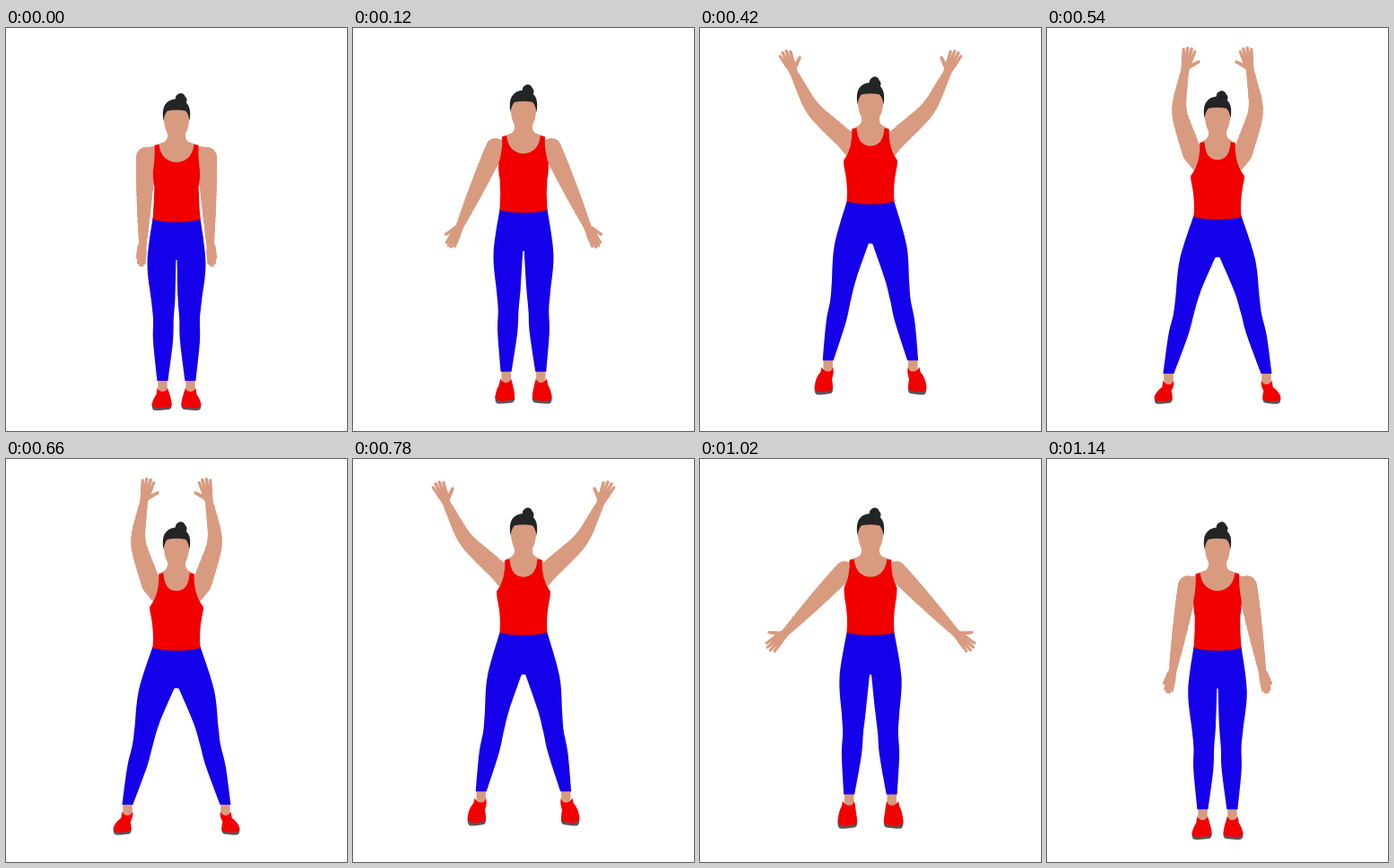
Write an HTML page with a canvas that moves like this. It is 380 by 450 pixels and loops after 1200 ms.

```html
<!DOCTYPE html>
<html lang="en">
<head>
<meta charset="utf-8">
<title>Jumping jack</title>
<style>
html, body { margin: 0; width: 100%; height: 100%; overflow: hidden; background: #fff; }
canvas { display: block; }
</style>
</head>
<body>
<canvas id="stage" width="380" height="450"></canvas>
<script>
const ctx = document.getElementById('stage').getContext('2d');
const SKIN = '#d89b80', RED = '#f20000', BLUE = '#1500ea', HAIR = '#232426', SOLE = '#5b5557';
const STEP = 60, STEPS = 20, MID = 190;
const WAIST = 212, HEM = 394;

// Left trouser leg when standing: waist, hip, thigh, knee, calf, hem
const OUTER = [[163.5, WAIST], [157.5, 262], [162, 305], [164, 325], [164, 350], [168.5, HEM]];
const INNER = [[188.5, 300], [186.8, 325], [186, 350], [180.5, HEM]];

const lerp = (a, b, t) => a + (b - a) * t;
const mix = (p, q, t) => [lerp(p[0], q[0], t), lerp(p[1], q[1], t)];
const clamp = t => Math.min(Math.max(t, 0), 1);
const smooth = t => t * t * (3 - 2 * t);

// Angles are in degrees from straight down, turning outwards
const move = ([x, y], deg, len) => {
  const r = deg * Math.PI / 180;
  return [x - Math.sin(r) * len, y + Math.cos(r) * len];
};

function dot([x, y], rx, ry = rx) {
  ctx.beginPath();
  ctx.ellipse(x, y, rx, ry, 0, 0, 7);
  ctx.fill();
}

function taper(p, q, a, b) {
  const ang = Math.atan2(q[1] - p[1], q[0] - p[0]) + Math.PI / 2;
  const c = Math.cos(ang), s = Math.sin(ang);
  ctx.beginPath();
  ctx.moveTo(p[0] + c * a, p[1] + s * a);
  ctx.lineTo(q[0] + c * b, q[1] + s * b);
  ctx.lineTo(q[0] - c * b, q[1] - s * b);
  ctx.lineTo(p[0] - c * a, p[1] - s * a);
  ctx.fill();
  dot(p, a);
  dot(q, b);
}

// Continues the path smoothly through the points
function curve(pts) {
  ctx.lineTo(...pts[0]);
  for (let i = 0; i < pts.length - 1; i++) {
    const b = pts[i], c = pts[i + 1], a = pts[i - 1] || b, d = pts[i + 2] || c;
    ctx.bezierCurveTo(b[0] + (c[0] - a[0]) / 6, b[1] + (c[1] - a[1]) / 6,
      c[0] - (d[0] - b[0]) / 6, c[1] - (d[1] - b[1]) / 6, ...c);
  }
}

function fill(svg, color) {
  ctx.fillStyle = color;
  ctx.fill(new Path2D(svg));
}

function drawHand(wrist, dir, open) {
  const palm = move(wrist, dir, 11);
  taper(wrist, palm, 4.3, lerp(4.8, 5.8, open));
  for (let side = -1.5; side <= 1.5; side++) {
    const root = move(palm, dir + 90, side * lerp(2.1, 2.7, open));
    taper(root, move(root, dir + side * 7 * open, 15.5 - 1.2 * side * side), 2.1, 1.6);
  }
  const base = move(move(wrist, dir, 5), dir + 90, 3);
  taper(base, move(base, dir + lerp(8, 50, open), 13), 2.5, 1.7);
}

function drawArm({ arm, bend, raise }) {
  const parts = 16, length = 95;
  let joint = mix([155.5, 144], [162, 143], raise);
  let dir = arm;
  const radius = u => lerp(10.6, 4.4, u ** 1.5);
  ctx.fillStyle = SKIN;
  taper(mix([166, 142], [170, 153], raise), joint, 10.5, radius(0));
  for (let i = 0; i < parts; i++) {
    dir = arm + bend * smooth(clamp((i / parts - .3) / .4));
    const next = move(joint, dir, length / parts);
    taper(joint, next, radius(i / parts), radius((i + 1) / parts));
    joint = next;
  }
  drawHand(joint, dir + 2, clamp((arm - 4) / 36));
}

function drawShoe([x, y], { spread, jump }) {
  ctx.fillStyle = SKIN;
  ctx.fillRect(x - 5.2, y - 3, 10.4, 17);
  ctx.save();
  ctx.translate(x, y + 8 - jump);
  ctx.scale(1, 1 + .36 * jump);
  const l = -12 - 4 * spread, r = 10 - 6 * spread, top = -6 - 2 * jump;
  fill(`M${l} 18C${l} 26 ${l + 3} 25 ${l + 8} 25L${r - 3} 24Q${r + 1} 23 ${r} 17Z`, SOLE);
  fill(`M${top} 0Q-4 4 0 4Q4 4 5.5 0Q7 4 ${r - 1} 11Q${r + 1} 18 ${r - 1} 21L${l + 10} 22.5
    Q${l + 1} 23 ${l} 18Q${l + 1} ${13 - 5 * jump} ${top - 1} ${7 - 4 * jump}Z`, RED);
  ctx.restore();
}

function drawLeg(pose) {
  // The leg swings out from the waist and shortens a little
  const swing = ([x, y]) => {
    const t = ((y - WAIST) / (HEM - WAIST)) ** 1.1 * pose.spread;
    return [x - 40 * t, y - 5.5 * t];
  };
  const outer = OUTER.map(swing);
  const inner = [[189.4 - 2 * pose.spread, 259], ...INNER.map(swing)].reverse();
  drawShoe(mix(outer.at(-1), inner[0], .5), pose);
  ctx.fillStyle = BLUE;
  ctx.beginPath();
  ctx.moveTo(191, WAIST);
  curve(outer);
  curve(inner);
  ctx.lineTo(191, 258.5);
  ctx.fill();
}

function drawTop({ arm, raise, jump }) {
  const high = arm / 165, strap = lerp(165.5, 170.5, high);
  const side = lerp(164, 160, raise), pit = lerp(160, 168, high), hem = 216.8 - 2.5 * jump;
  fill(`M191 116L180 116Q181 124 177 127L${strap} 131L163 142L164 166L191 166Z`, SKIN);
  fill(`M${strap} 131L${strap + 5} 130C${strap + 6} 143 180 150 191 150L191 ${hem}Q174 ${hem} 163.5 ${hem - 3}
    Q165 195 ${side + 1.5} 178Q${side} 172 ${side} ${pit}Q${strap + .5} ${pit - 13} ${strap} 131Z`, RED);
  ctx.strokeStyle = '#8c1038';
  ctx.lineWidth = .7;
  ctx.stroke(new Path2D(`M163.5 ${hem - 3}Q174 ${hem} 190 ${hem}`));
}

function drawHead() {
  fill('M176 90L176 104Q177 113 180 118L180 125L200 125L200 118Q203 113 204 104L204 90Z', SKIN);
  fill(`M175.5 104Q173.5 92 177 86Q181 79.5 190 79Q199 79.5 203 86Q206.5 92 204.5 104
    Q203.5 96 200 92.5Q190 90.5 180 92.5Q176.5 96 175.5 104Z`, HAIR);
  dot([194.8, 78.5], 5.2, 5.8);
  dot([192, 79], 3.2, 4.5);
  dot([197.5, 80.5], 4, 4);
}

function mirrored(draw, pose) {
  draw(pose);
  ctx.save();
  ctx.translate(2 * MID, 0);
  ctx.scale(-1, 1);
  draw(pose);
  ctx.restore();
}

// One swing out and back; the body hops once each way
function poseAt(phase) {
  const x = Math.PI * (1 - Math.abs(1 - 2 * phase));
  const arm = 84 - 82 * Math.cos(x) + 5 * Math.sin(x) + 4 * Math.sin(2 * x);
  return {
    arm,
    bend: 30 * Math.sin(Math.PI / 2 * clamp((x / Math.PI - .4) / .6)),
    raise: clamp(arm / 50),
    spread: (1 - Math.cos(x)) / 2,
    jump: Math.sin(x) ** 2
  };
}

function render(step) {
  const pose = poseAt(step / STEPS);
  ctx.fillStyle = '#fff';
  ctx.fillRect(0, 0, 380, 450);
  ctx.save();
  ctx.translate(0, -28 * pose.jump);
  mirrored(drawLeg, pose);
  mirrored(drawArm, pose);
  mirrored(drawTop, pose);
  drawHead();
  ctx.restore();
}

function tick() {
  render(Math.floor(performance.now() / STEP) % STEPS);
  requestAnimationFrame(tick);
}
tick();
</script>
</body>
</html>
```
